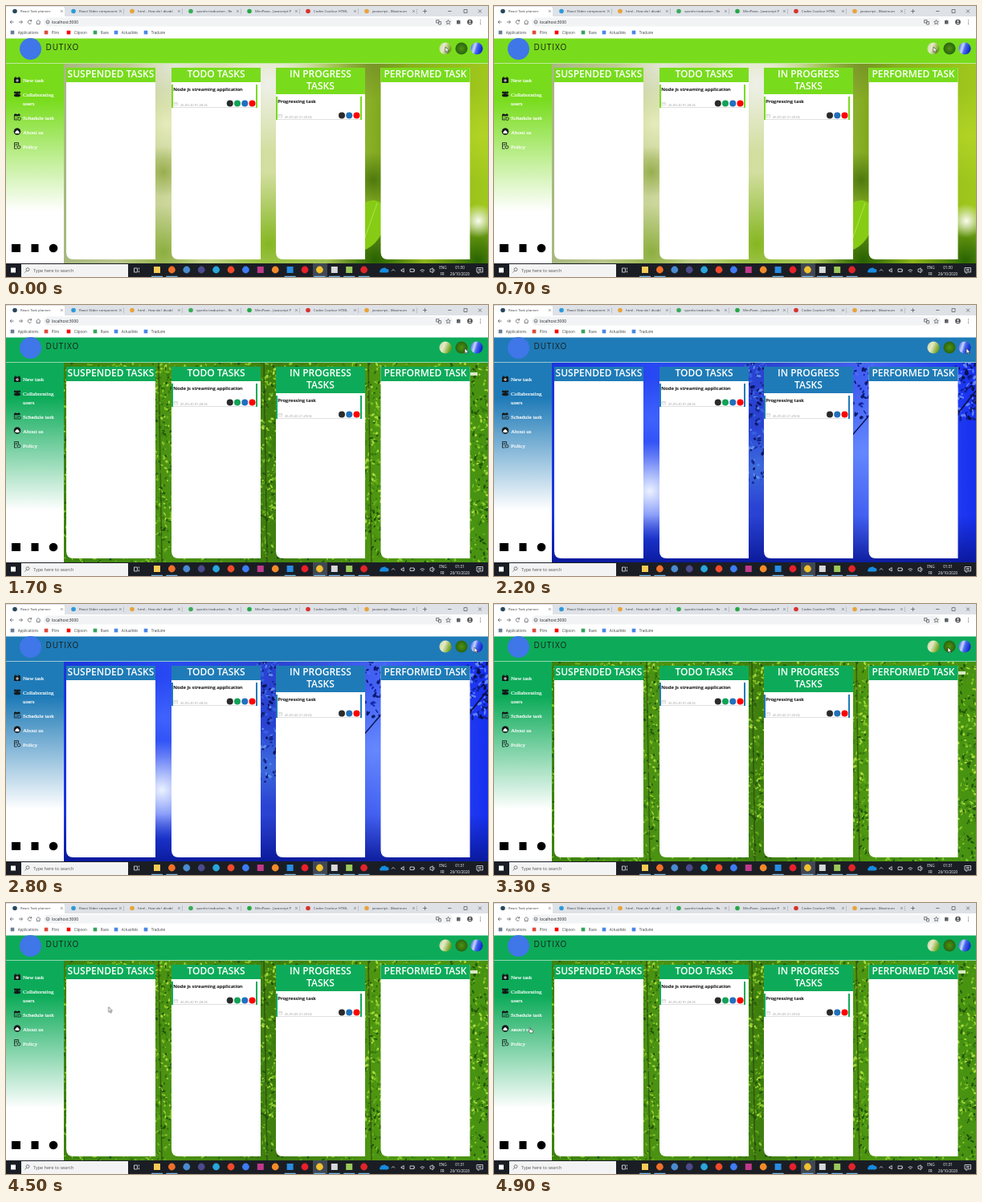
Recreate the animation shown at these times as an HTML page with a canvas. Size 600 px wide and 338 px high, loop 5 s.

```html
<!DOCTYPE html>
<html lang="en">
<head>
<meta charset="utf-8">
<title>Task planner</title>
<style>
@property --main { syntax: "<color>"; inherits: true; initial-value: #78dc1c; }
@property --edge { syntax: "<color>"; inherits: true; initial-value: #78dc1c; }
html, body { margin: 0; width: 100%; height: 100%; overflow: hidden; background: #fff; }
#stage {
  position: relative; width: 600px; height: 338px; overflow: hidden;
  animation: main 5s step-end infinite, edge 5s step-end infinite;
}
canvas { position: absolute; left: 72px; top: 72px; }
svg { position: absolute; left: 0; top: 0; }
text { font-family: "Open Sans", "Noto Sans", sans-serif; white-space: pre; }
.main { fill: var(--main); }
.edge { fill: var(--edge); }
.ui { font-size: 4.5px; fill: #3c4043; }
.tab { font-size: 4.3px; fill: #3c4043; }
.head { font-size: 12px; font-weight: 600; fill: #fff; text-anchor: middle; }
.title { font-size: 6px; font-weight: 600; fill: #000; stroke: #000; stroke-width: .1; }
.date { font-size: 4.1px; fill: #999; }
.menu { font: 7px "Liberation Serif", serif; fill: #fff; stroke: #fff; stroke-width: .18; }
.tray { font-size: 4.6px; fill: #fff; text-anchor: middle; }
.line { fill: none; stroke: #5f6368; stroke-width: .8; }
.pale { fill: none; stroke: #e8eaf0; stroke-width: .8; }

#forest { animation: forest 5s step-end infinite; }
#night { animation: night 5s step-end infinite; }
.early { animation: early 5s step-end infinite; }
.late { animation: late 5s step-end infinite; }
.rest { animation: rest 5s step-end infinite; }
.hover { animation: hover 5s step-end infinite; }
#cursor { animation: move 5s linear infinite; }

@keyframes main { 0% { --main: #78dc1c } 25.5% { --main: #0dab59 } 39.5% { --main: #1f7bb7 } 65.5%, 100% { --main: #0dab59 } }
@keyframes edge { 0% { --edge: #78dc1c } 27.5% { --edge: #0dab59 } 41.5% { --edge: #1f7bb7 } 67.5%, 100% { --edge: #0dab59 } }
@keyframes forest { 0% { opacity: 0 } 25.5% { opacity: 1 } 39.5% { opacity: 0 } 65.5%, 100% { opacity: 1 } }
@keyframes night { 0% { opacity: 0 } 39.5% { opacity: 1 } 65.5%, 100% { opacity: 0 } }
@keyframes early { 0% { opacity: 1 } 23.5%, 100% { opacity: 0 } }
@keyframes late { 0% { opacity: 0 } 23.5%, 100% { opacity: 1 } }
@keyframes rest { 0% { opacity: 1 } 95.5%, 100% { opacity: 0 } }
@keyframes hover { 0% { opacity: 0 } 95.5%, 100% { opacity: 1 } }
@keyframes move {
  0%, 15% { transform: translate(547px, 51px) }
  24%, 30% { transform: translate(565px, 54px) }
  34% { transform: translate(571px, 54px) }
  39%, 54% { transform: translate(588px, 54px) }
  63%, 70% { transform: translate(565px, 54px) }
  82%, 84% { transform: translate(213px, 104px) }
  96%, 100% { transform: translate(43px, 155px) }
}
</style>
</head>
<body>
<div id="stage">
<canvas id="meadow" width="528" height="249"></canvas>
<canvas id="forest" width="528" height="249"></canvas>
<canvas id="night" width="528" height="249"></canvas>
<svg width="600" height="338" viewBox="0 0 600 338">
  <defs>
    <linearGradient id="fade" x1="0" y1="0" x2="0" y2="1">
      <stop offset="0" style="stop-color:var(--main)"/>
      <stop offset=".24" style="stop-color:var(--main)"/>
      <stop offset="1" stop-color="#fff"/>
    </linearGradient>
    <linearGradient id="av0" x1="0" y1="0" x2="1" y2=".4"><stop offset="0" stop-color="#c3d19a"/><stop offset=".45" stop-color="#e6ebc8"/><stop offset="1" stop-color="#6f9f18"/></linearGradient>
    <radialGradient id="av1"><stop offset="0" stop-color="#4f9312"/><stop offset="1" stop-color="#2a6310"/></radialGradient>
    <linearGradient id="av2" x1="0" y1="0" x2="1" y2=".3"><stop offset="0" stop-color="#2440e8"/><stop offset=".4" stop-color="#c8d6ff"/><stop offset=".6" stop-color="#4468f0"/><stop offset="1" stop-color="#1428c8"/></linearGradient>
  </defs>

  <!-- browser -->
  <path d="M0 0H600V13H0Z" fill="#dee1e6"/>
  <path d="M0 2Q0 1 2 1H71Q73 1 73 4V13H0Z M0 13H600V41H0Z" fill="#fff"/>
  <g id="tabs"></g>
  <path class="line" d="M519 6.500h5M521.500 4v5M550 6.500h4.500M570 4.500h4v4h-4zM588 4.500l4 4m0-4l-4 4"/>
  <rect x="47" y="14.500" width="509" height="11" rx="5.500" fill="#f1f3f4"/>
  <path class="line" d="M9.500 20H5m2-2L5 20l2 2M16 20h4.500m-2-2l2 2-2 2M31.300 18.500a2.300 2.300 0 1 0 .3 2.500M31.600 17v2h-2M37.500 20l2.700-2.500 2.700 2.500M38.300 19.800v2.700h3.800v-2.700"/>
  <circle class="line" cx="52" cy="20" r="2"/><path class="line" d="M52 19.800v1.200"/>
  <text x="57" y="21.700" font-size="4.900" fill="#202124">localhost:3000</text>
  <path class="line" d="M535.500 17.500h3.500v3.500h-3.500zM538.500 19.500h3v3.500h-3z"/>
  <path class="line" d="M550.500 17.300l.8 1.900 2 .2-1.500 1.400.5 2-1.800-1.100-1.800 1.100.5-2-1.500-1.400 2-.2z"/>
  <path d="M561 18h1.500q.5-1.500 1.500 0h1.500v4.500H561z" fill="#5f6368"/>
  <circle cx="577.500" cy="20" r="3.300" fill="#4a4a4d"/>
  <circle cx="577.500" cy="18.900" r="1.100" fill="#fff"/><path d="M575.500 22q2-2.600 4 0z" fill="#fff"/>
  <g fill="#5f6368"><circle cx="590.500" cy="17.800" r=".6"/><circle cx="590.500" cy="20" r=".6"/><circle cx="590.500" cy="22.200" r=".6"/></g>
  <g id="marks"></g>

  <!-- header and sidebar -->
  <path class="main" d="M0 40.500H600V72H0Z"/>
  <path d="M0 71.200H600V72H0Z" fill="#eef5ee" opacity=".8"/>
  <circle cx="30.500" cy="53.500" r="13.500" fill="#3f76e8"/>
  <text x="49.500" y="55.300" font-size="10" letter-spacing=".9" fill="#1a1f1a">DUTIXO</text>
  <circle cx="547" cy="53" r="7.600" fill="url(#av0)"/>
  <circle cx="567" cy="53" r="7.600" fill="url(#av1)"/>
  <circle cx="586" cy="53" r="7.600" fill="url(#av2)"/>
  <path d="M0 72H72V321H0Z" fill="#fff"/>
  <path d="M0 72H72V256H0Z" fill="url(#fade)"/>
  <g fill="#15191a">
    <path d="M10 89.500h1.300v-1.200h1.200v1.200h3v-1.200h1.200v1.200H18v6.500H10z"/>
    <circle cx="14" cy="108.300" r="1.900"/><circle cx="11.300" cy="108" r="1.400"/><circle cx="16.700" cy="108" r="1.400"/>
    <path d="M9.800 112.500q0-3 2.500-2.700h3.400q2.500-.3 2.500 2.700h-1.500v.7h-5.400v-.7z"/>
    <path d="M10 135h1.500v-1h1v1h3v-1h1v1h1v2.200h-7.500z"/>
    <circle cx="14" cy="156.500" r="4.300"/>
  </g>
  <path d="M14 91v4M12 93h4" stroke="#fff" stroke-width=".8"/>
  <path d="M10.400 137v5h4M12 138.800h1M14 138.800h1M12 140.500h1M10.500 170.500h5v3M10.500 170.500v7.500h3M11.500 172.500h3M11.500 174.300h2" class="line" style="stroke:#15191a"/>
  <circle cx="16.500" cy="140.700" r="1.800" fill="none" stroke="#15191a" stroke-width=".8"/>
  <circle cx="16" cy="176" r="1.900" fill="none" stroke="#15191a" stroke-width=".8"/>
  <path d="M11.500 157l2.500-2.300 2.500 2.300v2h-5z" fill="#fff"/>
  <text class="menu" x="21" y="95.300">New task</text>
  <text class="menu" x="21" y="113.300">Collaborating</text>
  <text class="menu" x="21" y="123.500">users</text>
  <text class="menu" x="21" y="141.800">Schedule task</text>
  <g class="rest"><text class="menu" x="21" y="159.800">About us</text></g>
  <g class="hover"><text class="menu" x="21" y="159.800" style="font-size:5px;font-weight:700">ABOUT US</text></g>
  <text class="menu" x="21" y="178">Policy</text>
  <rect x="7" y="297" width="11" height="10" fill="#000"/>
  <rect x="31.500" y="297" width="9" height="10" fill="#000"/>
  <circle cx="59" cy="302" r="5.300" fill="#000"/>

  <g id="board"></g>

  <!-- taskbar -->
  <path d="M0 321H600V338H0Z" fill="#1a1e24"/>
  <rect x="12" y="326.500" width="6" height="6" fill="#fff" transform="translate(-6)"/>
  <path d="M19 322H152V338H19Z" fill="#f3f3f3"/>
  <circle class="line" cx="27" cy="328.700" r="2"/><path class="line" d="M25.500 330.300l-2 2.200"/>
  <text x="34" y="331.700" font-size="5.500" fill="#555">Type here to search</text>
  <path class="pale" d="M159.500 327h4v5h-4zM165.500 326.500v2M165.500 330v2.500"/>
  <path d="M382 321H400V338H382Z" fill="#414853"/>
  <g id="apps"></g>
  <path d="M466 332.500q-2-1.500 0-3 .5-3 3.500-2.500 2-2 4 .8 3 .2 3 2.700 0 2-2 2z" fill="#168be0"/>
  <path class="pale" d="M480 330.500l2-2 2 2M493 330.500l2.200 1.500v-4.500l-2.200 1.500h-1v1.500zM503 328h5v3.500h-5zM508.500 329v1.500M515.500 330a4 4 0 0 1 5.500 0M517 331.500a2 2 0 0 1 2.600 0M528 328v3.500h1.200l2 1.300v-6l-2 1.200zM532.500 328q1.300 1.800 0 3.500"/>
  <text class="tray" x="544" y="328">ENG</text><text class="tray" x="543" y="335.700">FR</text>
  <g class="early"><text class="tray" x="565" y="328">01:30</text></g>
  <g class="late"><text class="tray" x="565" y="328">01:31</text></g>
  <text class="tray" x="565" y="335.700">26/10/2020</text>
  <path class="pale" d="M586 326.500h7.500v5.500h-4l-1.500 1.700v-1.700h-2zM587.800 328.500h4M587.800 330.200h4"/>

  <g id="cursor">
    <path class="rest" d="M0 0V6.500L1.500 5.200 2.500 7.500 3.500 7 2.600 4.800H4.600Z" fill="#fff" stroke="#111" stroke-width=".5"/>
    <path class="hover" d="M1.200 .6q.8-.6 1.300.2V3l2.600.6q.8.300.6 1.300L5.200 7H2L0 4.600q.2-.8 1.200-.1z" fill="#fff" stroke="#111" stroke-width=".5"/>
  </g>
</svg>
</div>
<script>
const $ = id => document.getElementById(id);
const put = (id, html) => { $(id).innerHTML = html; };
const dot = (x, y, r, fill) => `<circle cx="${x}" cy="${y}" r="${r}" fill="${fill}"/>`;
const box = (x, y, w, h, fill) => `<rect x="${x}" y="${y}" width="${w}" height="${h}" fill="${fill}"/>`;
const text = (cls, x, y, s) => `<text class="${cls}" x="${x}" y="${y}">${s}</text>`;

// browser tabs
put('tabs', [
  ['React Task planner', '#28475a'], ['React Slider component', '#2c9ad8'],
  ['html - How do I disabl', '#e8a33a'], ['quenlo traduction - Re', '#3bab58'],
  ['MiniPane - Javascript P', '#27a746'], ['Codes Couleur HTML', '#d8322a'],
  ['javascript - Maximum', '#e8a33a']
].map(([name, fill], i) => {
  const x = 11 + i * 73;
  return dot(x, 6.5, 2.8, fill) + text('tab', x + 7, 8.1, name)
    + `<path class="line" style="stroke-width:.6" d="M${x + 57} 5.100l2.800 2.800m0-2.800l-2.800 2.800"/>`
    + (i ? box(x + 62.5, 3.5, .5, 6.5, '#9aa0a6') : '');
}).join(''));

// bookmarks
put('marks', [
  [8, 'Applications', '#6b7f94'], [50, 'Pliro', '#e04a3a'], [78, 'Clipoon', '#f00'],
  [111, 'Rues', '#35a35a'], [137, 'Actualités', '#4a86e8'], [174, 'Traduire', '#4a86e8']
].map(([x, name, fill]) => box(x - 2.3, 30.7, 4.6, 4.6, fill) + text('ui', x + 6.7, 34.7, name)).join(''));

// task board
const column = (x, lines) => {
  const top = 80 + lines.length * 15;
  return `<path d="M${x} 77h111V316H${x + 9}q-9 0-9-9z" fill="#fff"/>`
    + `<rect class="main" x="${x}" y="77" width="111" height="${top - 77}"/>`
    + lines.map((s, i) => text('head', x + 55.5, 89.4 + i * 15, s)).join('');
};
const card = (x, y, name, date, dx, dots) =>
  box(x, y, 107, 28.5, '#fff') + box(x, y + 28.2, 107, .6, '#ccc')
  + `<rect class="edge" x="${x}" y="${y}" width="2" height="29"/>`
  + `<rect class="edge" x="${x + 105}" y="${y}" width="2" height="29"/>`
  + text('title', x + 2.3, y + 7.8, name) + text('date', x + dx, y + 26.5, date)
  + `<path d="M${x + dx - 8} ${y + 22.5}h4.500v3.500h-4.500zm0 1.200h4.500" fill="none" stroke="#bbb" stroke-width=".5"/>`
  + dots.map((fill, i) => dot(x + 100.5 - (dots.length - 1 - i) * 9.25, y + 23.5, 4, fill)).join('');
put('board',
  column(75, ['SUSPENDED TASKS']) + column(206, ['TODO TASKS'])
  + column(336, ['IN PROGRESS', 'TASKS']) + column(466.5, ['PERFORMED TASK'])
  + card(206, 98, 'Node js streaming application', '26-09-20 01:28:26', 11, ['#2b2b2b', '#12a356', '#2070c0', '#f00'])
  + card(336, 113, 'Progressing task', '26-09-20 21:29:02', 11, ['#2b2b2b', '#2070b8', '#f00']));

// taskbar icons; open programs are underlined
const open = [0, 1, 9, 11, 12, 13, 14];
put('apps', ['#f5cb55', '#f0702a', '#4a8ad0', '#4b4a8c', '#29a5dc', '#f04a2a', '#3d7cf5', '#c0398a',
  '#f28a2a', '#2a8be0', '#e8202c', '#f0c030', '#d8d8d8', '#9ac85a', '#e0252a'
].map((fill, i) => {
  const x = 188 + i * 18.4;
  const icon = [0, 7, 9, 12, 13].includes(i) ? box(x - 4, 325, 8, 8, fill) : dot(x, 329, 4.4, fill);
  return icon + (open.includes(i) ? box(x - 7, 336.8, 14, 1.2, '#76b9ed') : '');
}).join(''));

// soft wallpapers
const random = seed => () => (seed = (seed * 16807) % 2147483647) / 2147483647;
function paint(id, stops, seed) {
  const c = $(id).getContext('2d'), rnd = random(seed);
  const base = c.createLinearGradient(0, 0, 528, 0);
  stops.forEach((s, i) => base.addColorStop(i / (stops.length - 1), s));
  c.fillStyle = base;
  c.fillRect(0, 0, 528, 249);
  const glow = (x, y, r, rgb, a = 1) => {
    const g = c.createRadialGradient(x, y, 0, x, y, r);
    g.addColorStop(0, `rgba(${rgb},${a})`);
    g.addColorStop(1, `rgba(${rgb},0)`);
    c.fillStyle = g;
    c.fillRect(x - r, y - r, 2 * r, 2 * r);
  };
  const leaves = (n, colors, x, y, w, h, size) => {
    for (let i = 0; i < n; i++) {
      c.fillStyle = colors[rnd() * colors.length | 0];
      c.beginPath();
      c.ellipse(x + rnd() * w, y + rnd() * h, size * (.4 + rnd()), size * (.3 + rnd() * .5), rnd() * 3, 0, 7);
      c.fill();
    }
  };
  const stroke = (color, width, x1, y1, x2, y2) => {
    c.strokeStyle = color;
    c.lineWidth = width;
    c.beginPath();
    c.moveTo(x1, y1);
    c.lineTo(x2, y2);
    c.stroke();
  };
  return { c, glow, leaves, stroke };
}

const meadow = paint('meadow', ['#a8b880', '#cdd79c', '#d3dfa0', '#7fa81a', '#a0c81c'], 5);
meadow.glow(140, 0, 60, '226,229,216');
meadow.glow(255, 25, 85, '238,240,232');
meadow.glow(128, 75, 45, '235,240,195', .8);
meadow.glow(124, 135, 32, '140,165,60', .8);
meadow.glow(124, 235, 60, '125,165,40', .8);
meadow.glow(255, 225, 90, '125,178,20', .9);
meadow.glow(385, 0, 45, '115,140,40', .7);
meadow.glow(385, 145, 35, '65,110,8', .8);
meadow.glow(388, 245, 60, '40,98,0');
meadow.glow(520, 90, 60, '182,214,40', .8);
meadow.glow(515, 245, 65, '35,95,0', .95);
meadow.glow(516, 196, 21, '250,252,240');
meadow.c.fillStyle = '#86cc14';
meadow.c.beginPath();
meadow.c.ellipse(376, 202, 22, 34, .5, 0, 7);
meadow.c.fill();
meadow.stroke('#b4e250', 1, 368, 236, 390, 174);

const forest = paint('forest', ['#3d820f', '#4c9312', '#3e7e0e', '#4f9711', '#479211'], 17);
forest.leaves(4500, ['#24560a', '#357a0e', '#4c9512', '#66ad1a', '#86c626', '#a6da3c'], 0, 0, 528, 200, 2);
forest.leaves(1300, ['#1d4a0a', '#2f6f0e', '#458c14', '#63a81c', '#8cc832'], 0, 170, 528, 80, 2);
for (const x of [118, 249, 379])
  forest.stroke('rgba(35,45,14,.5)', 1.5, x, 0, x + 4, 249);
forest.c.fillStyle = '#d9e8c5';
forest.c.fillRect(506, 12, 9, 4);

const night = paint('night', ['#1b35dc', '#2849f4', '#2a42d0', '#4463f4', '#1730f0'], 29);
night.glow(125, 70, 50, '70,105,255', .8);
night.glow(122, 160, 62, '235,242,255');
night.glow(255, 130, 50, '70,125,225', .7);
night.glow(388, 110, 80, '105,140,255', .9);
night.leaves(150, ['#0a1560', '#142a90', '#3560e0', '#5c8cf0'], 240, 0, 30, 150, 2.5);
night.leaves(60, ['#0b1870', '#1428a8', '#4a6cf8'], 370, 0, 30, 70, 2.5);
night.leaves(100, ['#08104a', '#101f90', '#5d82ff'], 500, 0, 28, 70, 2.5);
night.stroke('#0a1250', 2, 500, 70, 528, 35);
night.stroke('#0c165a', 1.5, 370, 95, 400, 60);
const floor = night.c.createLinearGradient(0, 190, 0, 249);
floor.addColorStop(0, 'rgba(8,22,150,0)');
floor.addColorStop(1, 'rgba(8,22,150,.9)');
night.c.fillStyle = floor;
night.c.fillRect(0, 190, 528, 59);
</script>
</body>
</html>
```
